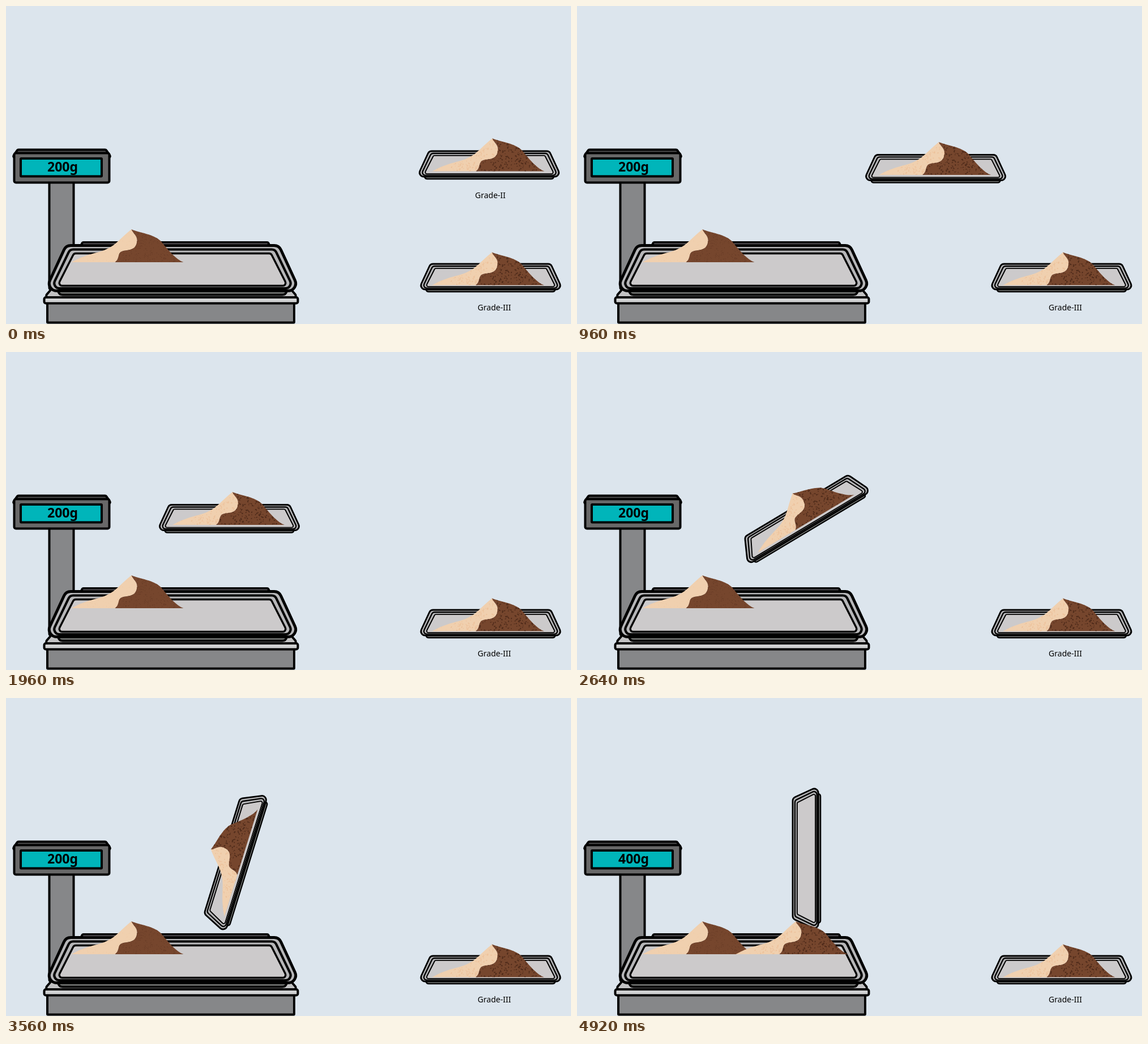
Animation, 998 px wide and 561 px high, one loop 5550 ms. Source, as an HTML page with a canvas:

```html
<!DOCTYPE html>
<html lang="en">
<head>
<meta charset="utf-8">
<title>Weighing samples</title>
<style>
  html, body { margin: 0; width: 100%; height: 100%; overflow: hidden; background: #dce5ed; }
  canvas { display: block; }
</style>
</head>
<body>
<canvas id="stage" width="998" height="561"></canvas>
<script>
const ctx = document.getElementById('stage').getContext('2d');
const LOOP = 5550, STEP = 40, LAST = 4920;
const progress = (t, start, length) => Math.max(0, Math.min(1, (t - start) / length));
const easeInOut = u => u < 0.5 ? 2 * u * u : 1 - 2 * (1 - u) ** 2;

// Both halves of a pile share the border that runs down from the peak
const border = 'M0 0C3 8 10 10 10 20C9 42-14 34-20 41C-24 46-22 53-29 58';
const light = new Path2D(border + 'H-106C-76 42-62 43-44 35S-18 14 0 0Z');
const dark = new Path2D(border + 'H92C80 54 66 38 54 23S12 6 0 0Z');

function makeSpecks(count, size, seed) {
  const random = () => (seed = (seed * 16807) % 2147483647) / 2147483647;
  const path = new Path2D();
  for (let i = 0; i < count; i++) {
    const x = random() * 200 - 106, y = random() * 60, r = size * (0.6 + random());
    path.moveTo(x, y);
    path.ellipse(x, y, r, r * 0.65, random() * 3, 0, 7);
  }
  return path;
}
const coarse = { specks: makeSpecks(560, 1.05, 71), onLight: '#edc29c', onDark: '#4f2b1a' };
const fine = { specks: makeSpecks(900, 0.6, 29), onLight: '#efcba8', onDark: '#653a25' };

// Runs paint with the origin moved to x, y
function at(x, y, paint, { size = 1, angle = 0, alpha = 1 } = {}) {
  ctx.save();
  ctx.globalAlpha = alpha;
  ctx.translate(x, y);
  ctx.rotate(angle);
  ctx.scale(size, size);
  paint();
  ctx.restore();
}

function grains(shape, fill, specks, color) {
  ctx.save();
  ctx.fillStyle = fill;
  ctx.fill(shape);
  ctx.clip(shape);
  ctx.fillStyle = color;
  ctx.fill(specks);
  ctx.restore();
}

function pile(x, y, { specks, onLight, onDark }, alpha) {
  at(x, y, () => {
    grains(light, '#f0d0af', specks, onLight);
    grains(dark, '#76462d', specks, onDark);
  }, { alpha });
}

// Outlined trapezoid, symmetric about x, given by its half widths
function slab(x, top, bottom, halfTop, halfBottom, fill, line = 4, radius = 3) {
  ctx.beginPath();
  ctx.moveTo(x, top);
  ctx.arcTo(x + halfTop, top, x + halfBottom, bottom, radius);
  ctx.arcTo(x + halfBottom, bottom, x, bottom, radius);
  ctx.arcTo(x - halfBottom, bottom, x - halfTop, top, radius);
  ctx.arcTo(x - halfTop, top, x, top, radius);
  ctx.closePath();
  ctx.fillStyle = fill;
  ctx.fill();
  ctx.lineWidth = line;
  ctx.stroke();
}

const box = (x, top, bottom, half, fill, line, radius) =>
  slab(x, top, bottom, half, half, fill, line, radius);

// Foot first, then three nested rims; the upper rim lies at y = 0
function tray() {
  slab(0, 70, 87, 205, 200, '#777977', 4, 8);
  for (let i = 0; i < 3; i++) {
    slab(0, 7 * i, 80 - 4.5 * i, 188 - 7 * i, 225 - 11 * i,
      i < 2 ? '#b6b6b8' : '#cccacb', 5 - 0.8 * i, 13 - 4 * i);
  }
}

const smallTray = (x, y) => at(x, y, tray, { size: 0.565 });

function text(string, x, y, font, alpha) {
  at(x, y, () => {
    ctx.font = font + ' "Noto Sans", sans-serif';
    ctx.textAlign = 'center';
    ctx.fillStyle = '#000';
    ctx.fillText(string, 0, 0);
  }, { alpha });
}

function scale(swap) {
  box(98, 300, 500, 21.5, '#868789');
  slab(98.5, 253.5, 268, 78, 88, '#4d4d4d');
  box(98.5, 259.5, 311.5, 84, '#686868');
  box(97.5, 269, 300.5, 71.5, '#00b5ba', 4, 1);
  text('200g', 100, 292, 'bold 23px', 1 - swap);
  text('400g', 100, 292, 'bold 23px', swap);

  box(291, 520, 558.5, 218, '#868789', 4, 1);
  slab(291.5, 498, 514, 210, 224, '#c2c2c3');
  box(291.5, 514, 524.5, 224, '#d0d1d2');
  slab(299, 417, 426, 164, 168, '#8a858c');
  at(294, 422.5, tray);
  pile(221.5, 394, fine);
}

function draw(t) {
  ctx.fillStyle = '#dce5ed';
  ctx.fillRect(0, 0, 998, 561);

  const swap = progress(t, 4480, 440);
  scale(swap);

  smallTray(856, 455);
  pile(858.5, 434.5, coarse);
  text('Grade-III', 862.5, 537, '14px');
  if (t < STEP) text('Grade-II', 855.5, 339, '14px');

  const slide = easeInOut(progress(t, 107, 1743));
  const angle = -Math.PI / 2 * progress(t, 1960, 1980);
  at(853.5 - 459 * slide, 269.5 + 13.5 * slide, () => {
    smallTray(0, -13.5);
    pile(5.5, -36, coarse, 1 - progress(t, 3940, 500));
  }, { angle });

  pile(386.5, 394, coarse, swap);
}

function frame() {
  const t = performance.now() % LOOP;
  draw(Math.min(LAST, Math.floor(t / STEP) * STEP));
  requestAnimationFrame(frame);
}
frame();
</script>
</body>
</html>
```
